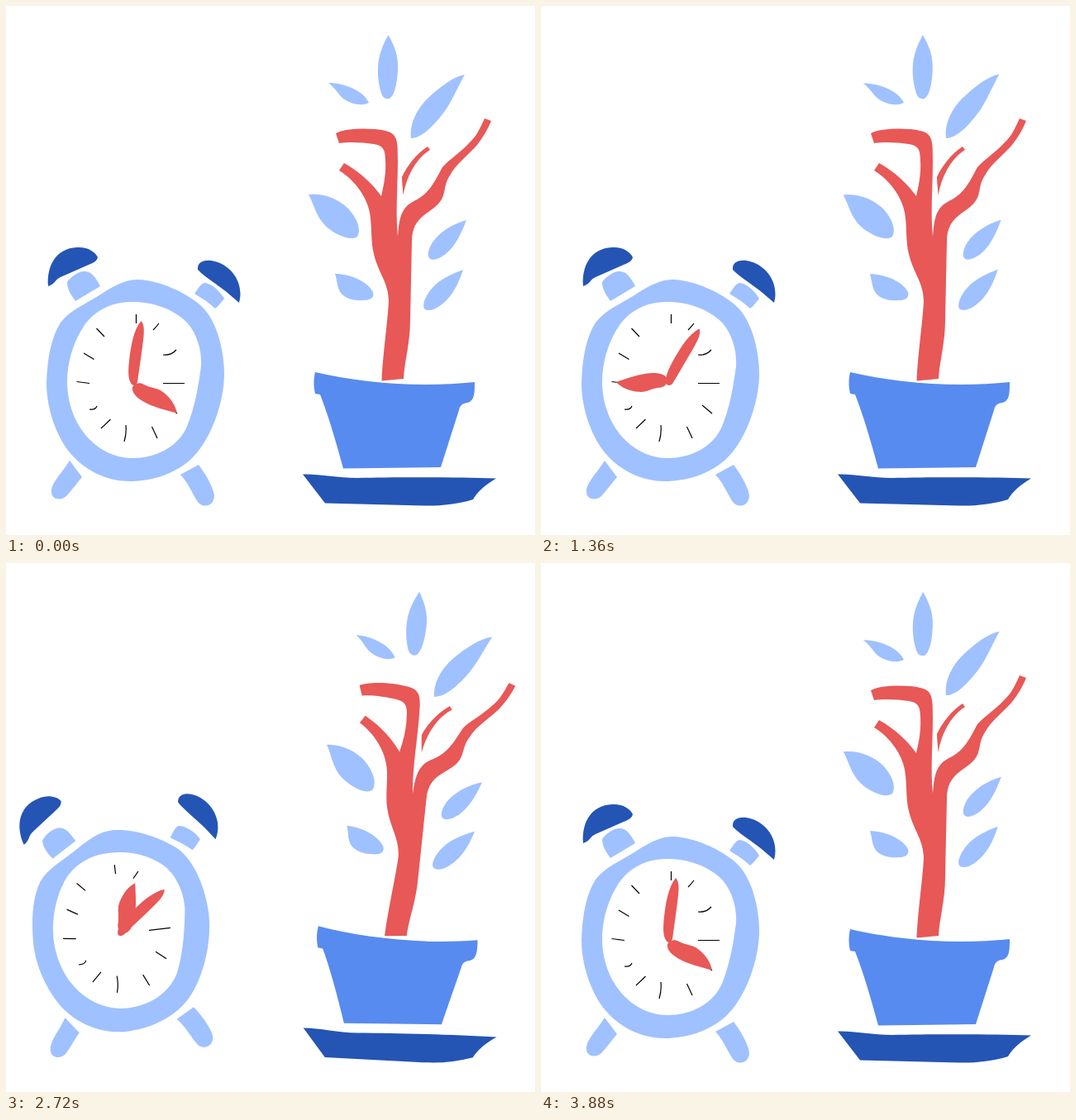
An HTML page for the animation above (3.92 s loop, 640 px wide and 640 px high).

```html
<!DOCTYPE html>
<html lang="en">
<head>
<meta charset="utf-8">
<title>Clock and plant</title>
<style>
  html, body { margin: 0; width: 100%; height: 100%; overflow: hidden; background: #fff; }
  svg { display: block; width: 100%; height: 100%; }
  .light { fill: #9fc1ff; }
  .mid { fill: #578bef; }
  .dark { fill: #2455b4; }
  .red { fill: #e75857; }
  .ticks { fill: none; stroke: #000; stroke-width: 1.2; }
</style>
</head>
<body>
<svg viewBox="0 0 640 640">
  <g id="clock">
    <path class="light" d="M77 550L92 570C86 577 78 588 73 593C66 599 56 597 55 589C54 581 60 574 64 568C69 562 73 556 77 550Z"/>
    <path class="light" d="M211 567L233 555C240 564 250 580 252 592C252 603 242 608 234 602C228 596 221 577 211 567Z"/>
    <path class="light" d="M84 357L114 339C109 329 103 320 94 321C86 322 78 328 74 334C74 343 79 350 84 357Z"/>
    <path class="light" d="M228 348C232 343 235 336 240 335C249 336 259 345 264 354C260 359 257 363 253 366C246 359 236 353 228 348Z"/>
    <path id="bellL" class="dark" d="M51 339C49 315 60 293 86 292C98 291 108 297 111 304C110 309 105 311 100 313L66 328C59 331 60 336 51 339Z"/>
    <path id="bellR" class="dark" d="M232 317C232 310 240 307 248 308C270 311 289 333 282 359L268 347C260 340 238 326 232 319Z"/>
    <path class="light" fill-rule="evenodd" d="M160 331C187 332 217 347 234 361C254 377 264 415 264 445C264 481 247 527 223 549C204 566 176 575 150 575C118 575 88 558 71 532C56 508 49 480 49 456C50 425 55 400 66 383C78 367 98 360 116 348C133 337 145 331 160 331Z
      M153 358C180 358 205 368 220 384C233 400 237 420 236 436C233 458 229 485 218 511C206 535 180 547 153 547C125 547 103 530 91 512C80 496 74 475 74 455C74 430 82 405 95 386C108 368 128 358 153 358Z"/>
    <path class="ticks" d="M157.5 373V384M185 384Q182 388 178 392M190 422Q200 423 206 416M190 456.5H216M195 483L207 493M176.5 509L183 523M145 507Q146 517 143 527M126.5 500L115 511M110 484Q108 489 101 488M85.5 454.5L101 456.5M94 420L106.5 427.5M109.5 390L119 400"/>
    <path id="minute" class="red" d="M163 381C167 385 167 393 166 402C164 420 161 440 159 455C157 460 153 460 151 456C147 450 148 438 149 428C151 411 154 392 163 381Z"/>
    <path id="hour" class="red" d="M153 461C156 456 162 455 167 458C174 462 184 462 190 467C200 475 205 483 207 492.5C193 489 178 485 167 479C158 474 152 468 153 461Z"/>
  </g>
  <g id="plant">
    <g id="tree">
      <path class="red" d="M454.5 453.5L481 451C482 430 489 408 489 380L491 285C491 260 505 254 518 244C535 231 527 220 537 205C544 191 563 177 570 168C577 159 583 149 587 139L579 136C573 149 569 158 561 165C549 178 536 186 528 195C521 208 514 223 502 231C495 236 490 237 485 242C476 251 475 265 474 279C471 250 474 220 474 187C474 164 474 154 459 151C441 147 410 148 399 154L403 166C415 164 432 165 445 167C455 169 459 172 459 187C460 203 457 217 454 230C443 215 430 202 409 190L403 199C424 212 437 233 440 250C443 266 441 285 445 300C450 322 463 335 463 357C462 380 456 420 454.5 453.5Z"/>
      <path class="red" d="M510 170L513 174C497 184 485 204 480.5 229C480 220 479 213 479 207C484 195 497 178 510 170Z"/>
      <g class="light">
        <path data-base="460 112" d="M462.5 35C471 50 475 62 474 78C473 95 470 108 464 112C459 113 455 111 453 102C450 90 449 78 451 65C453 54 457 45 462.5 35Z"/>
        <path data-base="439 118" d="M390 93C410 93 433 103 439 117C430 122 416 118 408 112C402 107 398 99 390 93Z"/>
        <path data-base="490 160" d="M555 83C548 95 538 119 528 131C517 145 503 160 490 160C488 145 495 127 510 112C525 98 540 86 555 83Z"/>
        <path data-base="427 281" d="M366 228C385 226 403 234 414 245C425 257 430 270 425 279C417 285 400 277 390 269C375 257 373 240 366 228Z"/>
        <path data-base="511 307" d="M557 259C551 275 544 290 532 300C524 306 516 309 512 305C509 301 512 292 516 286C525 273 540 264 557 259Z"/>
        <path data-base="444 352" d="M398 324C417 324 438 334 444 346C446 353 441 356 432 356C422 357 410 354 405 347C400 340 401 332 398 324Z"/>
        <path data-base="506 367" d="M553 319C548 335 540 352 526 362C518 368 510 370 506 366C503 360 509 349 515 342C525 330 540 324 553 319Z"/>
      </g>
    </g>
    <path class="mid" d="M374 443C430 456 500 462 567 455C567 468 567 478 558 480C550 481 549 485 548 489L526 558L408 559.5C400 530 390 495 380 470L374 469C372 460 372 452 374 443Z"/>
    <path class="dark" d="M359 566.5C380 566 400 571 425 571C470 570 540 570 593 571.5C580 579 570 588 565 597C545 603 525 605 505 604.5L386 601.5Z"/>
  </g>
</svg>
<script>
  const LOOP = 3920, TURN = 3840, SWAY = 1280;
  const $ = id => document.getElementById(id);
  const leaves = document.querySelectorAll('[data-base]');
  const rotate = (el, deg, base) =>
    el.setAttribute('transform', `rotate(${deg.toFixed(3)} ${base})`);

  const linear = u => u;
  const smooth = u => (1 - Math.cos(Math.PI * u)) / 2;

  // keys: [time, value] pairs in order
  function track(keys, t, ease) {
    if (t <= keys[0][0]) return keys[0][1];
    for (let i = 1; i < keys.length; i++) {
      const [t0, v0] = keys[i - 1], [t1, v1] = keys[i];
      if (t < t1) return v0 + (v1 - v0) * ease((t - t0) / (t1 - t0));
    }
    return keys[keys.length - 1][1];
  }

  const hourKeys = [[0, 0], [560, 59.5], [1360, 146.6], [1920, 180], [2160, 202],
    [2720, 258.5], [2960, 288.5], [TURN, 360]];
  const ringKeys = [[2440, 0], [2695, 1.13], [2810, 0]];
  const potKeys = [[2440, 0], [2710, 1.5], [2880, 0]];
  const bendKeys = [[2440, 0], [2710, 3.3], [2960, -1.1], [3240, 0]];

  function draw(t) {
    const center = '154.5 456.3';
    rotate($('minute'), Math.min(t / TURN, 1) * 1080, center);
    rotate($('hour'), track(hourKeys, t, linear), center);

    const ring = track(ringKeys, t, smooth);
    rotate($('clock'), -6.6 * ring, '76 598');
    rotate($('bellL'), -13 * ring, '40 336');
    rotate($('bellR'), 12.6 * ring, '295 360');

    rotate($('plant'), track(potKeys, t, smooth), '518 592');
    rotate($('tree'), track(bendKeys, t, smooth), '467 453');

    const sway = 2 - 2 * Math.cos(2 * Math.PI * (t - 160) / SWAY);
    for (const leaf of leaves) rotate(leaf, sway - 0.6, leaf.dataset.base);
  }

  const start = performance.now();
  function tick() {
    draw((performance.now() - start) % LOOP);
    requestAnimationFrame(tick);
  }
  tick();
</script>
</body>
</html>
```
